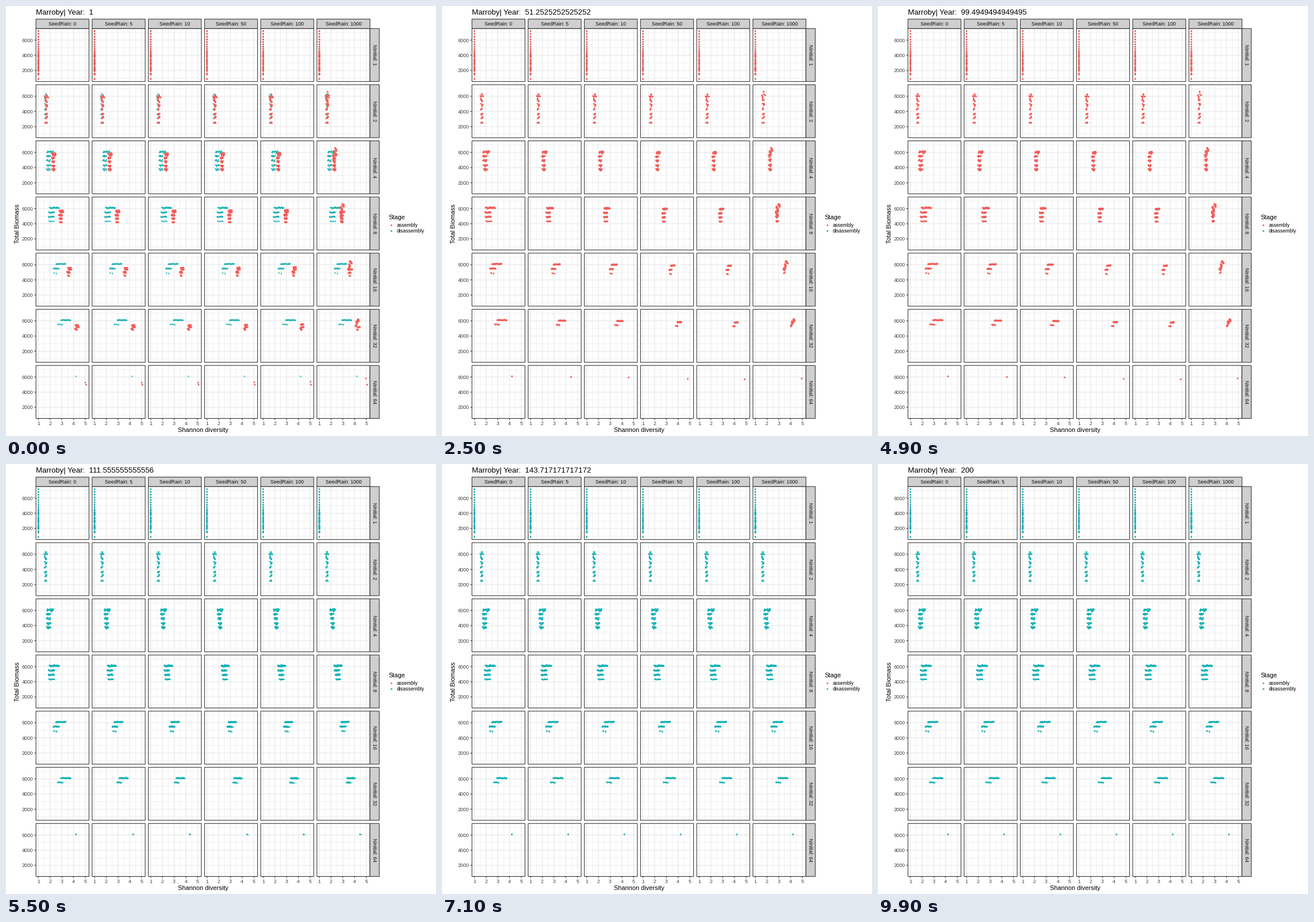
A matplotlib script for the animation above (10 s loop, 748 by 748 pixels).

```python
import numpy as np
import matplotlib.pyplot as plt
from matplotlib.animation import FuncAnimation
from matplotlib.collections import LineCollection
from matplotlib.colors import to_rgb
from matplotlib.patches import Rectangle

SIZE, DPI, FRAMES = 748, 88, 100
PX = 72 / DPI  # points per pixel
RED, TEAL = "#F35E5A", "#17B3B7"
DARK, GRID, STRIP = "#333333", "#E7E7E7", "#CFCFCF"

LEFT, TOP, GAP = 52.1, 39.2, 5.5
STEP_X, STEP_Y = 97.75, 97.68
WIDE, HIGH = STEP_X - GAP, STEP_Y - GAP
RIGHT, BOTTOM = LEFT + 6 * STEP_X - GAP, TOP + 7 * STEP_Y - GAP

RAIN = np.array([0, 5, 10, 50, 100, 1000])
CENTER = [1, 1.62, 2.0, 2.37, 2.92, 3.35, 4.2]  # resting diversity per row
COUNT = [55, 29, 52, 60, 36, 28, 1]
GOLDEN = .618034

# Effect of seed rain, down the first axis
rain = RAIN[:, None]
PULL_X = .86 * rain / (rain + 11)
PULL_Y = .46 * rain / (rain + 25)
PACE = 1 / (1 + rain / 60)

rng = np.random.default_rng(7)


def px_x(x, col):
    return LEFT + STEP_X * col + 4.2 + (x - 1) * 20.4


def px_y(y, row):
    return TOP + STEP_Y * row + 20.1 + (6000 - y) * .0132


def settle(a, b, t, tau):
    return b + (a - b) * np.exp(-t / tau)


def single_species():
    tail = 4400 + 2780 * np.linspace(.1, 1, 9) ** 1.2
    y = np.r_[tail[::-1], rng.uniform(1470, 4400, 45), 880]
    return np.ones_like(y), y


def mixture(row):
    """Communities on biomass levels; richer rows reach fewer levels."""
    n = COUNT[row]
    i = np.arange(n)
    depth = 1 + 6 * ((6 - row) / 5) ** 1.8
    level = np.floor(depth * ((i + .5) / n) ** 1.4)
    lower = level > 0
    half = min(.42, .14 * row) * np.where(lower, .6, 1)
    across = 2 * ((i * GOLDEN + .5) % 1) - 1
    x = CENTER[row] - .13 * (row - 1) * lower + half * across
    y = 6090 - 590 * level + rng.normal(0, 20 + 200 / 2 ** row, n)
    return x, y


def community(row):
    """Resting, first and rained-on positions with relaxation times."""
    x0, y0 = mixture(row) if row else single_species()
    n = len(x0)
    lift = np.clip((y0 - 3800) / 2250, 0, 1.4)
    noise = rng.normal(0, .03, n) * (row > 0)
    x1 = 1 + .675 * row + (x0 - CENTER[row]) / max(row, 1) + noise
    y1 = y0 - 180 * row * lift
    gain = 70 * row * (6.5 - row) * (1 - i_frac(n))
    xe = x0 + PULL_X ** (.2 + .13 * row) * (x1 - x0)
    ye = y0 + PULL_Y * (y1 - y0) + rain / 1000 * gain * lift
    tau = 11 + np.clip(6100 - y0, 0, None) / 1950 * 16
    tau = tau * rng.uniform(.85, 1.15, n)
    return x0, y0, x1, y1, xe, ye, tau, np.full(n, row)


def i_frac(n):
    return np.arange(n) * GOLDEN % 1


parts = [np.concatenate(p, axis=-1) for p in zip(*map(community, range(7)))]
X0, Y0, X1, Y1, XE, YE, TAU, ROW = parts
COL = np.arange(6)[:, None]


def assembly(t):
    tau = TAU * PACE
    return settle(X1, XE, t, tau), settle(Y1, YE, t, .3 * tau)


PEAK = assembly(100)


def year_at(i):
    return 1 + i * (199 / 99)


def state(i):
    """Pixel positions and colour of all communities at step i."""
    year = year_at(i)
    if year <= 100:
        poses = [assembly(0), assembly(1)] if i == 0 else [assembly(year)]
        color = RED
    else:
        t = year - 100
        poses = [(settle(PEAK[0], X0, t, TAU), settle(PEAK[1], Y0, t, .3 * TAU))]
        color = TEAL
    pts = [np.c_[px_x(x, COL).ravel(), px_y(y, ROW).ravel()] for x, y in poses]
    return np.concatenate(pts), color


plt.rcParams["font.family"] = "Liberation Sans"
fig = plt.figure(figsize=(SIZE / DPI, SIZE / DPI), dpi=DPI, facecolor="white")
ax = fig.add_axes([0, 0, 1, 1])
ax.set(xlim=(0, SIZE), ylim=(SIZE, 0))
ax.axis("off")


def label(x, y, s, size=8.8, color="#111111", ha="center", rotation=0):
    return ax.text(x, y, s, fontsize=size * PX, color=color, ha=ha,
                   va="baseline", rotation=rotation, rotation_mode="anchor",
                   zorder=5)


def box(x, y, w, h, fill="none"):
    ax.add_patch(Rectangle((x, y), w, h, facecolor=fill, edgecolor=DARK,
                           lw=1.07 * PX, zorder=4, snap=False))


def lines(segs, color, width, z):
    ax.add_collection(LineCollection(segs, colors=color, linewidths=width * PX,
                                     zorder=z, snap=False))


major, minor, ticks = [], [], []
for r in range(7):
    top = TOP + STEP_Y * r
    for c in range(6):
        left = LEFT + STEP_X * c
        for k in range(2, 11):
            x = px_x(k / 2, c)
            (minor if k % 2 else major).append([(x, top), (x, top + HIGH)])
        for k in range(1, 8):
            y = px_y(1000 * k, r)
            (minor if k % 2 else major).append([(left, y), (left + WIDE, y)])
        box(left, top, WIDE, HIGH)
    for v in (2000, 4000, 6000):
        y = px_y(v, r)
        ticks.append([(LEFT - 2.8, y), (LEFT, y)])
        label(47.2, y + 3.2, str(v), color="#444444", ha="right")
    box(RIGHT, top, 16.2, HIGH, STRIP)
    label(RIGHT + 4.9, top + HIGH / 2, f"Ninitial: {2 ** r}", rotation=270)

for c, amount in enumerate(RAIN):
    left = LEFT + STEP_X * c
    box(left, TOP - 16.4, WIDE, 16.4, STRIP)
    label(left + WIDE / 2, 34.1, f"SeedRain: {amount}")
    for v in range(1, 6):
        x = px_x(v, c)
        ticks.append([(x, BOTTOM), (x, BOTTOM + 2.8)])
        label(x, 729.4, str(v), color="#444444")

lines(minor, GRID, .55, 1)
lines(major, GRID, 1.07, 1)
lines(ticks, DARK, 1.07, 4)

label(342.6, 741, "Shannon diversity", 11, "black")
label(23.4, 378.5, "Total Biomass", 11, "black", rotation=90)
label(665, 370.5, "Stage", 11, "black", ha="left")
for y, name, color in ((381.4, "assembly", RED), (391, "disassembly", TEAL)):
    ax.scatter([669.8], [y], s=(2.9 * PX) ** 2, c=color, lw=0)
    label(679.8, y + 3, name, color="black", ha="left")
title = label(52, 15.2, "", 13.2, "black", ha="left")
dots = ax.scatter([], [], lw=0, zorder=3)

STATES = [state(i) for i in range(FRAMES)]
WAKE = 5


def draw(i):
    pts, sizes, colors = [], [], []
    for k in reversed(range(WAKE)):  # shrinking wake first, present on top
        fade = (1 - k / (WAKE + 1)) ** 2
        xy, color = STATES[(i - k) % FRAMES]
        pts.append(xy)
        sizes.append(np.full(len(xy), ((1.5 + 1.4 * fade) * PX) ** 2))
        colors.append(np.tile([*to_rgb(color), fade], (len(xy), 1)))
    dots.set_offsets(np.concatenate(pts))
    dots.set_sizes(np.concatenate(sizes))
    dots.set_facecolors(np.concatenate(colors))
    title.set_text(f"Marroby| Year:  {year_at(i):.15g}")
    return dots, title


anim = FuncAnimation(fig, draw, frames=FRAMES, interval=100, repeat=True,
                     repeat_delay=0, init_func=lambda: draw(0))
plt.show()
```
